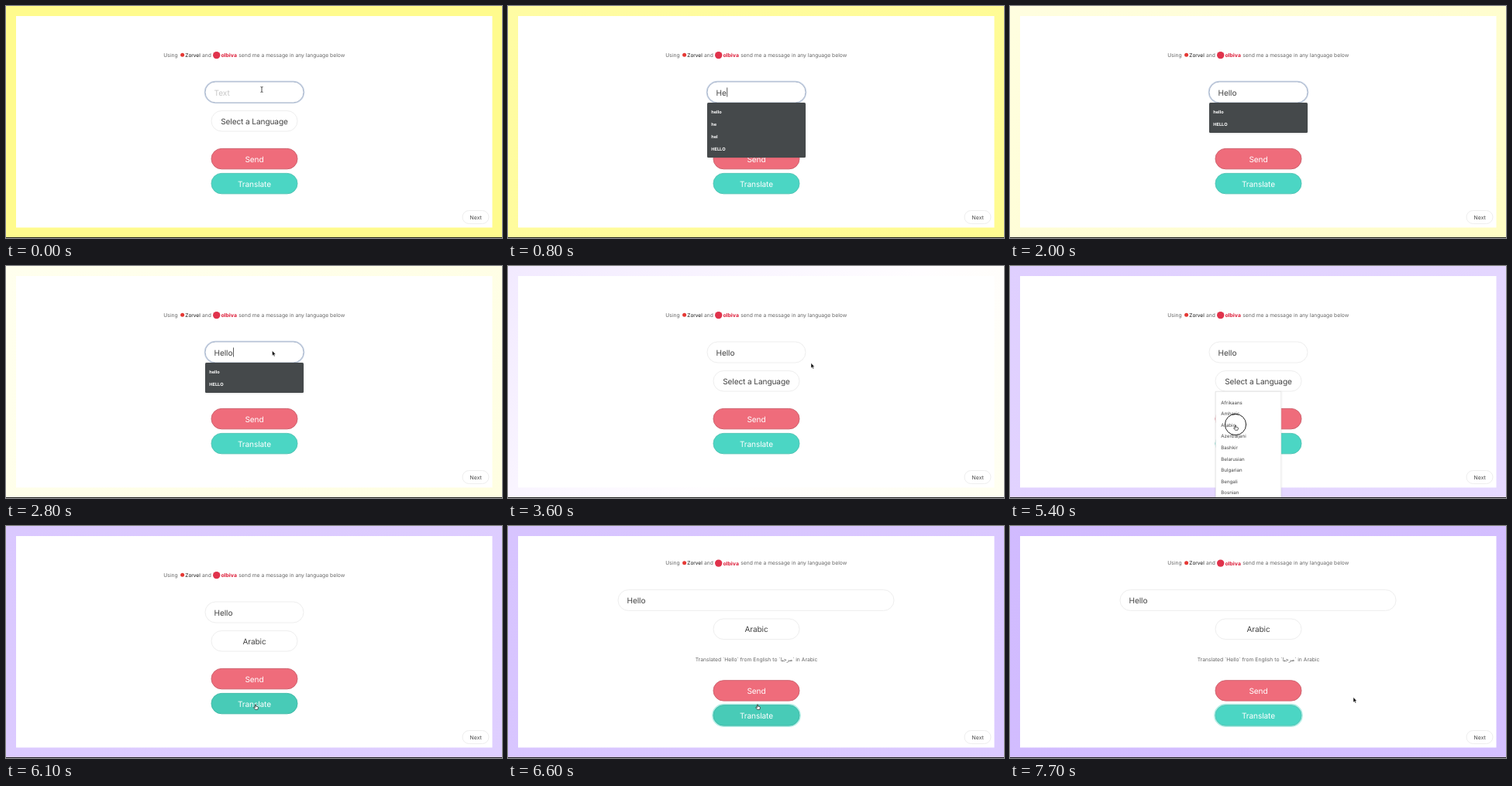
These frames come from a looping animation (640 by 300 pixels, 8 s). An HTML page:

```html
<!DOCTYPE html>
<html lang="en">
<head>
<meta charset="utf-8">
<title>Translate a message</title>
<style>
  html, body { margin: 0; width: 100%; height: 100%; overflow: hidden; background: #fff; }
  #stage { position: absolute; left: 0; top: 0; width: 640px; height: 300px; }
  svg { display: block; }
  text { font-family: Inter, Roboto, sans-serif; fill: #444; white-space: pre; text-rendering: geometricPrecision; }
  .small { font-size: 6.75px; fill: #666; }
  .label { font-size: 10.1px; letter-spacing: -.01em; }
  .mid { text-anchor: middle; }
  .light { fill: #fff; }
  .pill { fill: #fff; stroke: #eee; }
  .option { font-size: 6.15px; }
  .hint { font-size: 5.7px; font-weight: 700; fill: #fff; }
</style>
</head>
<body>
<div id="stage">
<svg width="640" height="300" viewBox="0 0 640 300">
  <defs>
    <filter id="shadow" x="-20%" y="-20%" width="140%" height="140%">
      <feDropShadow dx="0" dy=".5" stdDeviation="1" flood-opacity=".15"/>
    </filter>
  </defs>
  <rect x="13" y="13" width="614.5" height="273.5" fill="#fff"/>

  <g id="upper">
    <text class="small" x="203.3" y="65.8">Using</text>
    <circle cx="227.6" cy="63.3" r="2.5" fill="#e53935"/>
    <text x="231.3" y="65.8" style="font-size:6.5px;fill:#111">Zorvel</text>
    <text class="small" x="253" y="65.8">and</text>
    <circle cx="271.7" cy="63.6" r="4.7" fill="#e0334c"/>
    <text x="277.4" y="66" style="font-size:6.8px;font-weight:800;fill:#e0334c">olbiva</text>
    <text class="small" x="300.2" y="65.8">send me a message in any language below</text>
    <rect id="halo" y="97.6" height="27.6" rx="13.8" fill="none" stroke="#cad5e6" stroke-width="1.8"/>
    <rect id="field" class="pill" y="98" height="27" rx="13.5"/>
    <text id="typed" class="label" y="115.6"></text>
    <rect id="caret" y="105.5" width=".8" height="12" fill="#333"/>
    <rect class="pill" x="265" y="135.5" width="111" height="26.5" rx="13.2"/>
    <text id="choice" class="label mid" x="320.5" y="152.7"></text>
  </g>

  <text id="result" class="small mid" x="320.5" y="175.3">Translated `Hello` from English to `مرحبا` in Arabic</text>

  <g id="lower">
    <rect x="265" y="184.4" width="111" height="26.4" rx="13.2" fill="#ef6c7b" stroke="#cf6470"/>
    <text class="label mid light" x="320.5" y="201.6">Send</text>
    <rect id="glow" x="264.4" y="215.8" width="112.2" height="27.6" rx="13.8" fill="none" stroke="#b5efe7" stroke-width="2.6"/>
    <rect id="translate" x="265" y="216.4" width="111" height="26.4" rx="13.2"/>
    <text class="label mid light" x="320.5" y="233.6">Translate</text>
  </g>

  <rect class="pill" x="589" y="264.5" width="34" height="17" rx="8.5"/>
  <text class="mid" x="606.2" y="275.6" style="font-size:6.9px">Next</text>

  <g id="hints">
    <rect id="hintBox" x="257" y="125" width="127" rx="1.5" fill="#45494b" filter="url(#shadow)"/>
    <g id="hintRows"></g>
  </g>
  <g id="menu">
    <rect x="265.4" y="162.5" width="84.4" height="150" fill="#fff" stroke="#e2e2e2" stroke-width=".6" filter="url(#shadow)"/>
    <g id="options"></g>
  </g>
  <rect y="299" width="640" height="1" fill="#222"/>

  <circle id="ring" r="13.6" fill="none" stroke="#222"/>
  <g id="mouse">
    <path id="beam" d="M-1.5-3.5Q0-3.5 0-2.5Q0-3.5 1.5-3.5M0-2.5V2.5M-1.5 3.5Q0 3.5 0 2.5Q0 3.5 1.5 3.5" fill="none" stroke="#222" stroke-width=".8"/>
    <path id="arrow" d="M0-.5V6L1.5 4.7L2.5 7L3.6 6.5L2.6 4.3H4.5Z" fill="#000" stroke="#fff" stroke-width=".5"/>
    <path id="hand" d="M-.6 0Q0-.7.6 0V2.2L3 2.8Q3.7 3.1 3.5 4L2.8 6.3H-.4L-2.4 3.8Q-2.3 2.9-1.5 3.2L-.6 4Z" fill="#fff" stroke="#222" stroke-width=".7"/>
  </g>
</svg>
</div>
<script>
const LOOP = 8000;
const el = id => document.getElementById(id);
const show = (id, on) => { el(id).style.display = on ? '' : 'none'; };
const set = (id, attrs) => { for (const k in attrs) el(id).setAttribute(k, attrs[k]); };
const within = (t, from, to) => t >= from && t < to;

// Border colours, swept from the top-left corner; time in seconds, latest first.
const SWEEP_DELAY = .7;
const sweep = [
  [8, '#cfb8ff'], [6.1, '#dac8ff'], [5.4, '#dfcfff'], [3.6, '#f2eaff'], [3.2, '#fffdff'],
  [2.9, '#fffff0'], [2, '#fffee0'], [1.4, '#fffdca'], [.8, '#fffca4'], [0, '#fffb8d']
];
const typing = [[0, ''], [400, 'H'], [700, 'He'], [1000, 'Hel'], [1200, 'Hell'], [1400, 'Hello']];
const history = ['hello', 'he', 'hel', 'HELLO'];
const languages = ['Afrikaans', 'Amharic', 'Arabic', 'Azerbaijani', 'Bashkir', 'Belarusian', 'Bulgarian', 'Bengali', 'Bosnian'];
const path = [
  [0, 330, 108], [2700, 330, 108], [3050, 398, 118], [3450, 391, 126], [3600, 391, 126], [3850, 354, 149],
  [4300, 354, 149], [5100, 291, 206], [5750, 291, 206], [6050, 322, 231], [6650, 322, 231], [7200, 443, 222]
];
const clicks = [3050, 3900, 5400, 6350];

const blurAt = 3050, openAt = 3950, pickAt = 5550, resultAt = 6500;

function mouseAt(t) {
  const i = path.findIndex(p => p[0] > t);
  if (i < 0) return path[path.length - 1].slice(1);
  const [a, b] = [path[i - 1], path[i]];
  const u = (t - a[0]) / (b[0] - a[0]), e = u * u * (3 - 2 * u);
  return [a[1] + (b[1] - a[1]) * e, a[2] + (b[2] - a[2]) * e];
}

const rows = (list, cls, x, y, step) =>
  list.map((s, i) => `<text class="${cls}" x="${x}" y="${y + i * step}">${s}</text>`).join('');

el('options').innerHTML = rows(languages, 'option', 272.3, 178.5, 14.62);

let shownHints = null;
function drawHints(word) {
  const list = word ? history.filter(s => s.toLowerCase().startsWith(word.toLowerCase())) : [];
  const key = list.join();
  if (key === shownHints) return;
  shownHints = key;
  set('hintBox', { height: list.length * 16 + 7 });
  el('hintRows').innerHTML = rows(list, 'hint', 262.2, 139, 16);
}

function render(t) {
  el('stage').style.background = `linear-gradient(135deg, ${
    sweep.map(([at, c]) => `${c} ${((t / 1000 - at) / SWEEP_DELAY * 100).toFixed(2)}%`).join(', ')})`;

  const done = t >= resultAt, focused = t < blurAt;
  set('upper', { transform: `translate(0 ${done ? -15.5 : 0})` });
  set('lower', { transform: `translate(0 ${done ? 15.3 : 0})` });
  show('result', done);

  const x = done ? 142 : 257, width = done ? 356 : 127;
  set('field', { x, width, style: focused ? 'stroke:#a9b6cb' : '' });
  set('halo', { x: x - .4, width: width + .8 });
  show('halo', focused);

  const word = typing.filter(k => k[0] <= t).pop()[1];
  set('typed', { x: x + 11.6, style: word ? '' : 'fill:#c6c6c6' });
  el('typed').textContent = word || 'Text';
  show('caret', focused && (within(t, 400, 1900) || within(t, 2400, 2900)));
  if (word) set('caret', { x: x + 12.2 + el('typed').getComputedTextLength() });

  drawHints(word);
  show('hints', focused && word);
  show('menu', within(t, openAt, pickAt));
  el('choice').textContent = t < pickAt ? 'Select a Language' : 'Arabic';

  const hover = within(t, 5950, 6800);
  set('translate', { fill: hover ? '#48cbb7' : '#4bd6c4', stroke: hover ? '#42bba9' : '#54c5b6' });
  show('glow', t >= 6350);

  const [mx, my] = mouseAt(t);
  set('mouse', { transform: `translate(${mx} ${my})` });
  show('beam', t < 350);
  show('hand', within(t, 3750, 6850));
  show('arrow', within(t, 2700, 3750) || t >= 6850);
  set('ring', { cx: mx, cy: my - 1 });
  show('ring', clicks.some(c => Math.abs(t - c) < 110));
}

let start = null;
function frame(now) {
  if (start === null) start = now;
  render((now - start) % LOOP);
  requestAnimationFrame(frame);
}
render(0);
requestAnimationFrame(frame);
</script>
</body>
</html>
```
